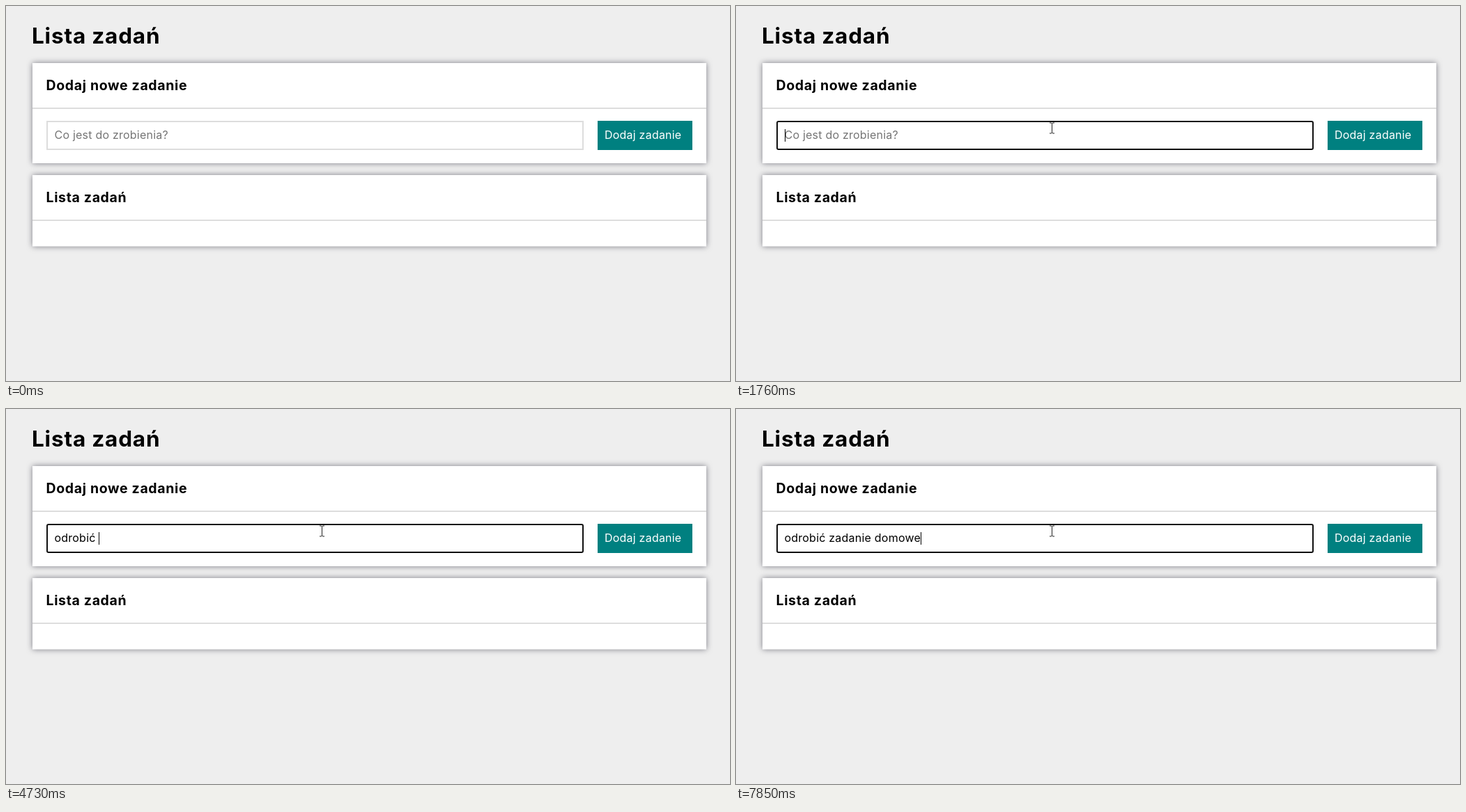
Write an HTML page that moves like this. It is 1039 px wide and 539 px high and loops after 8000 ms.

```html
<!DOCTYPE html>
<html lang="pl">
<head>
<meta charset="utf-8">
<title>Lista zadań</title>
<style>
  html, body { margin: 0; width: 100%; height: 100%; overflow: hidden; background: #eee; }
  svg { display: block; width: 100vw; height: 100vh; }
  text { font-family: Inter, "Open Sans", sans-serif; white-space: pre; }
  .card { fill: #fff; filter: drop-shadow(0 0 4px rgba(50, 50, 65, .62)); }
  .rule { fill: #ddd; }
  .h1 { font-size: 31.5px; font-weight: 700; letter-spacing: .8px; }
  .h2 { font-size: 19.5px; font-weight: 700; letter-spacing: .65px; }
  .body { font-size: 16px; letter-spacing: .22px; }
</style>
</head>
<body>
<svg viewBox="0 0 1039 539" preserveAspectRatio="none">
  <rect width="1039" height="539" fill="#eee"/>
  <text class="h1" x="37" y="54">Lista zadań</text>

  <rect class="card" x="38" y="82" width="967" height="144"/>
  <text class="h2" x="57.5" y="121">Dodaj nowe zadanie</text>
  <rect class="rule" x="38" y="146" width="967" height="2"/>
  <rect id="field" x="59" y="166" width="769" height="40" fill="#fff" stroke-width="2"/>
  <text id="hint" class="body" x="69.5" y="191" fill="#757575">Co jest do zrobienia?</text>
  <text id="typed" class="body" x="69.5" y="191"></text>
  <rect id="caret" y="177" width="1" height="18"/>
  <rect x="849" y="165" width="136" height="42" fill="teal"/>
  <text class="body" x="859" y="191" fill="#fff">Dodaj zadanie</text>

  <rect class="card" x="38" y="243" width="967" height="102.5"/>
  <text class="h2" x="57.5" y="282">Lista zadań</text>
  <rect class="rule" x="38" y="307" width="967" height="2"/>

  <path id="arrow" d="M0 0V17L4 13.2L6.6 19.2L9.2 18.1L6.6 12.2H12Z" fill="#fff" stroke="#000"/>
  <path id="beam" d="M-3.5 -7.5H-1L0 -6.5L1 -7.5H3.5M0 -6.5V6.5M-3.5 7.5H-1L0 6.5L1 7.5H3.5" fill="none" stroke="#222"/>
</svg>
<script>
const LOOP = 8000, ENTER = 330, FOCUS = 1760, STEP = 68;
const phrase = "odrobić zadanie domowe";
const keyTimes = [2610, 2810, 3130, 3340, 3670, 3800, 4260, 4730, 5050, 5260, 5590,
  5780, 6060, 6190, 6390, 6790, 7060, 7190, 7390, 7520, 7720, 7850];
// pointer stops: time, x, y
const route = [[330, 919, 527], [534, 640, 325], [738, 467.5, 192.5], [874, 452.5, 164.5], [1070, 461.5, 180.5]];

const [field, hint, typed, caret, arrow, beam] =
  ["field", "hint", "typed", "caret", "arrow", "beam"].map(id => document.getElementById(id));
const show = (el, on) => el.setAttribute("visibility", on ? "visible" : "hidden");
const set = (el, attrs) => { for (const k in attrs) el.setAttribute(k, attrs[k]); };

function pointerAt(t) {
  if (t >= FOCUS) return [453.5, 175.5];
  if (t >= 1600) return [442.5, 169.5];
  if (t >= 1070) return [461.5, 180.5];
  const s = ENTER + Math.floor((t - ENTER) / STEP) * STEP;
  const i = Math.max(1, route.findIndex(p => p[0] >= s));
  const [t0, x0, y0] = route[i - 1], [t1, x1, y1] = route[i];
  const k = (s - t0) / (t1 - t0);
  return [x0 + (x1 - x0) * k, y0 + (y1 - y0) * k];
}

function drawPointer(t) {
  const [x, y] = pointerAt(t);
  const inside = x > 58 && x < 829 && y > 158 && y < 207;
  show(arrow, t >= ENTER && !inside);
  show(beam, t >= ENTER && inside);
  set(inside ? beam : arrow, { transform: `translate(${x} ${y})` });
}

function drawField(t) {
  const focused = t >= FOCUS;
  const count = keyTimes.filter(k => k <= t).length;
  set(field, { stroke: focused ? "#101010" : "#ddd", rx: focused ? 2 : 0 });
  show(hint, !count);
  typed.textContent = phrase.slice(0, count);
  const width = count ? typed.getComputedTextLength() : 0;
  set(caret, { x: Math.round(69.6 + width) });
  show(caret, focused && (count || t < 2210));
}

function render(t) {
  drawPointer(t);
  drawField(t);
}

const start = performance.now();
function tick() {
  render((performance.now() - start) % LOOP);
  requestAnimationFrame(tick);
}
tick();
</script>
</body>
</html>
```
